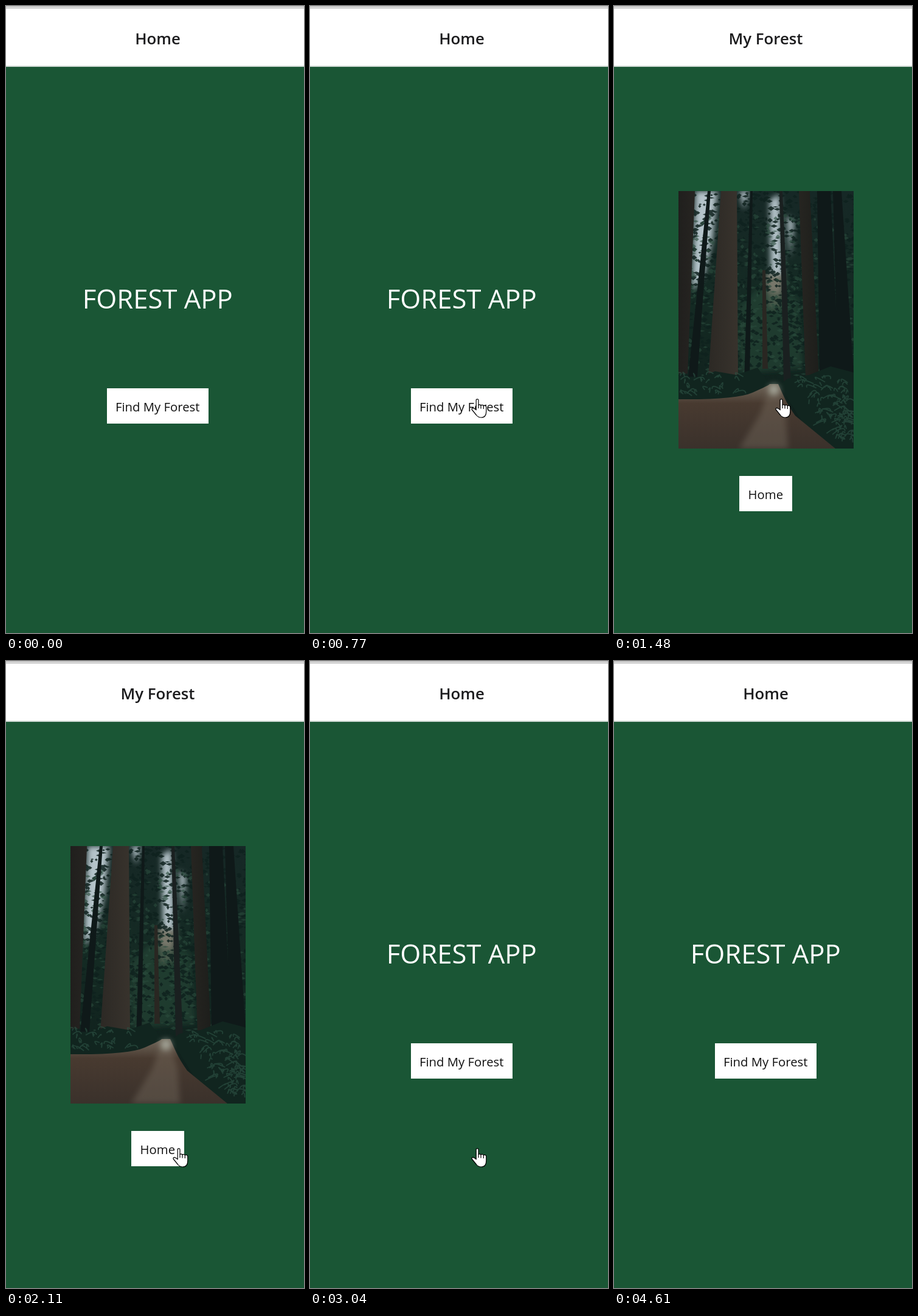
Recreate the animation shown at these times as an HTML page. Size 490 by 1030 pixels, loop 5940 ms.

```html
<!DOCTYPE html>
<html lang="en">
<head>
<meta charset="utf-8">
<title>Forest App</title>
<style>
  html, body { margin: 0; width: 100%; height: 100%; overflow: hidden; background: #1a5635; }
  svg { display: block; width: 490px; height: 1030px; }
  text { font-family: "Open Sans", "Noto Sans", sans-serif; text-anchor: middle; }
  .title { font-size: 25.8px; font-weight: 600; fill: #1c1c1e; }
  .label { font-size: 20.3px; fill: #111; }
  .cursor { fill: #fff; stroke: #000; stroke-width: 1.2; stroke-linejoin: round; }
</style>
</head>
<body>
<svg viewBox="0 0 490 1030">
  <defs>
    <linearGradient id="woods" x2="0" y2="1">
      <stop offset="0" stop-color="#162826"/>
      <stop offset=".45" stop-color="#142a23"/>
      <stop offset="1" stop-color="#0e1d1a"/>
    </linearGradient>
    <linearGradient id="dirt" x2="0" y2="1">
      <stop offset="0" stop-color="#71685b"/>
      <stop offset=".3" stop-color="#483a30"/>
      <stop offset="1" stop-color="#3a312b"/>
    </linearGradient>
    <linearGradient id="bark">
      <stop offset="0" stop-color="#201f1d"/>
      <stop offset=".5" stop-color="#3c362f"/>
      <stop offset="1" stop-color="#1d1e1b"/>
    </linearGradient>
    <filter id="soft" x="-50%" y="-50%" width="200%" height="200%"><feGaussianBlur stdDeviation="5"/></filter>
    <filter id="slight"><feGaussianBlur stdDeviation=".6"/></filter>
    <clipPath id="photoEdge"><path d="M0 0H288V423H0Z"/></clipPath>
  </defs>

  <path fill="#1a5635" d="M0 0H490V1030H0Z"/>
  <path fill="#fff" d="M0 0H490V98H0Z"/>
  <path fill="#dedede" d="M0 0H490V4H0Z"/>
  <path fill="#b4b4b4" d="M0 0H490V1H0ZM0 3H490V4H0Z"/>
  <path fill="#d0d9d4" d="M0 98H490V100H0Z"/>
  <text id="title" class="title" x="249.5" y="63"></text>

  <g id="home">
    <text x="249.3" y="497" font-size="43.6" font-weight="450" fill="#fff">FOREST APP</text>
    <g class="button">
      <path fill="#fff" d="M166 628H333V686H166Z"/>
      <text class="label" x="249.2" y="666">Find My Forest</text>
    </g>
  </g>

  <g id="forest">
    <g transform="translate(106 304)" clip-path="url(#photoEdge)">
      <path fill="url(#woods)" d="M0 0H288V423H0Z"/>
      <g filter="url(#soft)">
        <path fill="#b4c3c9" d="M28 0H64L56 80 42 140 22 165ZM150 15L166 5 172 140 152 160ZM100 0H116L108 30ZM178 40L190 50 184 110Z"/>
        <path fill="#77776a" d="M142 135H174L168 190 148 195Z"/>
        <path fill="#2a4938" d="M98 190L130 160 195 175 205 290 100 300Z" opacity=".6"/>
      </g>
      <g filter="url(#slight)">
        <path id="darkLeaves" fill="#0f211e" opacity=".85"/>
        <path id="leaves" fill="#2b4b3d" opacity=".6"/>
        <path fill="#0f1919" d="M48 0H53L31 305H16ZM118 0H122L117 312H108ZM228 0H250L264 300H232ZM254 0H268L288 300H262Z"/>
        <path fill="#292722" d="M138 130H143L147 292H138Z"/>
        <path fill="#1a2020" d="M166 0H171L185 314H173Z"/>
        <path fill="url(#bark)" d="M0 0H27L15 300H0ZM70 0H96L98 306H49ZM198 0H216L231 306H209Z"/>
        <path fill="#11251f" d="M0 304L30 308 60 296 95 302 130 290 150 318 110 345H0ZM166 318L180 308 215 302 250 288 288 298V423H230Z"/>
        <path fill="url(#dirt)" d="M0 342Q95 343 122 331T150 317H164Q168 326 174 339T192 369L258 423H0Z"/>
        <path id="ferns" fill="none" stroke="#2c5143" stroke-width="1.8" opacity=".65"/>
      </g>
      <g filter="url(#soft)">
        <path fill="#8b8072" opacity=".3" d="M150 322H164L176 365 180 423H100L135 365Z"/>
        <ellipse cx="157" cy="326" rx="9" ry="9" fill="#b4b9ac" opacity=".7"/>
      </g>
    </g>
    <g class="button">
      <path fill="#fff" d="M206 772H293V830H206Z"/>
      <text class="label" x="249.3" y="810">Home</text>
    </g>
  </g>

  <path id="arrow" class="cursor" d="M.6 .8V23.6L5.9 18.6 9.4 26.4 12.9 24.9 9.5 17.3H17.5Z"/>
  <g id="hand" class="cursor">
    <path d="M-1.8 18.5V2.6Q-1.8 .8 .1 .8T2 2.6V10.5Q4 8.8 6 11Q8.3 9.3 10.3 11.6Q14.6 10.6 14.8 14V21Q14.8 31 6.5 31Q1.5 31 -1.5 27L-8.8 18Q-9.7 15.7 -6.8 15.4Q-4.5 16 -1.8 18.5Z"/>
    <path fill="none" d="M2 10.5V16M6 11V16.5M10.3 11.6V17"/>
  </g>
  <circle id="tap" r="18" fill="#d2d810" opacity=".65"/>
</svg>

<script>
const LOOP = 5940;
const $ = id => document.getElementById(id);

// Pointer stops: time, shape, hotspot x, hotspot y
const stops = [
  [0, ''],
  [300, 'arrow', 279, 802], [390, 'arrow', 279, 760],
  [620, 'arrow', 277, 716], [700, 'hand', 276, 668], [770, 'hand', 275, 645],
  [1870, 'arrow', 279, 690], [1950, 'arrow', 287, 727], [2030, 'arrow', 292, 764],
  [2110, 'hand', 284, 800], [2260, 'hand', 275, 800],
  [3360, 'arrow', 276, 790], [3440, 'arrow', 273, 762], [3520, 'arrow', 270, 733],
  [3600, 'arrow', 267, 705], [3680, 'hand', 265, 680], [3760, 'hand', 263, 661],
  [4530, 'arrow', 290, 766], [4610, '']
];

let seed = 7;
const random = (min, max) => {
  seed = (seed * 16807) % 2147483647;
  return min + (max - min) * seed / 2147483647;
};
const scatter = (count, mark) => Array.from({ length: count }, mark).join('');

function leaf(top, bottom) {
  const w = random(2, 6), h = random(1, 4);
  return `M${random(-5, 288)} ${random(top, bottom)}l${w} ${-h} ${w} ${h} ${-w} ${h}Z`;
}

function frond() {
  const right = random(0, 1) < .7;
  const y = right ? random(305, 410) : random(300, 334);
  const x = right ? random(182 + (y - 305) * .75, 285) : random(0, 115);
  return `M${x} ${y}q${random(-8, 8)} -9 ${random(-18, 18)} ${random(-4, 5)}`;
}

$('darkLeaves').setAttribute('d', scatter(1300, () => leaf(0, 290)));
$('leaves').setAttribute('d', scatter(450, () => leaf(40, 310)));
$('ferns').setAttribute('d', scatter(130, frond));

const show = (el, on) => el.style.display = on ? '' : 'none';
const place = (el, x, y) => el.setAttribute('transform', `translate(${x} ${y})`);
const within = (t, from, to) => t >= from && t < to;
const buttons = document.querySelectorAll('.button');

function render(t) {
  const inForest = within(t, 1480, 3040);
  show($('home'), !inForest);
  show($('forest'), inForest);
  $('title').textContent = inForest ? 'My Forest' : 'Home';

  const pressed = within(t, 1320, 1480) || within(t, 2890, 3040);
  buttons.forEach(button => button.setAttribute('opacity', pressed ? .2 : 1));

  const [, shape, x = 0, y = 0] = stops.findLast(stop => stop[0] <= t);
  for (const name of ['arrow', 'hand']) {
    show($(name), name === shape);
    place($(name), x, y);
  }
  show($('tap'), within(t, 1320, 1400) || within(t, 2890, 3040));
  place($('tap'), x, y);
}

const start = performance.now();
function tick() {
  render((performance.now() - start) % LOOP);
  requestAnimationFrame(tick);
}
tick();
</script>
</body>
</html>
```
